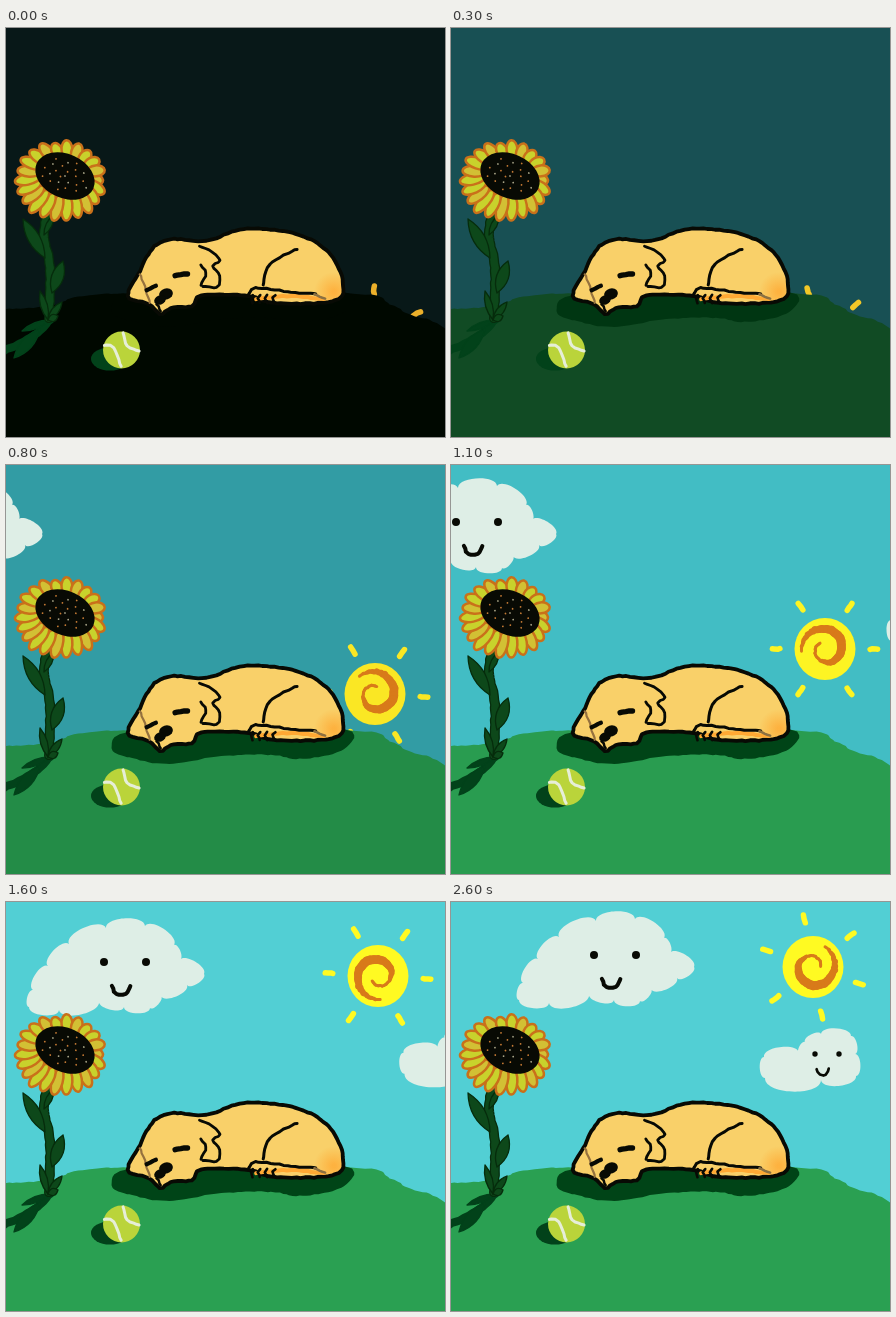
Write an HTML page with a canvas that moves like this. It is 439 px wide and 409 px high and loops after 3 s.

```html
<!DOCTYPE html>
<html lang="en">
<head>
<meta charset="utf-8">
<title>Sleeping puppy at sunrise</title>
<style>
  html, body { margin: 0; width: 100%; height: 100%; overflow: hidden; }
  canvas { display: block; }
</style>
</head>
<body>
<canvas id="stage" width="439" height="409"></canvas>
<script>
const ctx = document.getElementById('stage').getContext('2d');
const LOOP = 3000, STEP = 100, LAST = 2600, DAWN = 1400;
const INK = '#080a04', CLOUD = '#deeee6', STEM = '#0d481a', VEIN = '#062c0c';
const SHADE = '#02421a', ORANGE = '#c9701a', FUR = '#f9d069', SEAM = '#e6eed8';
const { PI, sin, cos, hypot, min, max } = Math;

// Key points as [time, x, y]
const SUN_PATH = [[300, 369, 311], [500, 366, 291], [800, 369, 229], [1100, 374, 184], [1600, 372, 74], [2300, 362, 65]];
const CLOUD_PATH = [[600, -253, 4], [1100, -138, 4], [1600, -45, 7], [1900, 0, 0]];

function along(path, time) {
  const next = path.findIndex(key => key[0] > time);
  if (next < 1) return path.at(next).slice(1);
  const [t0, x0, y0] = path[next - 1], [t1, x1, y1] = path[next];
  const k = (time - t0) / (t1 - t0);
  return [x0 + (x1 - x0) * k, y0 + (y1 - y0) * k];
}

// Ease-out between two colours; a higher power brightens sooner
function fade(from, to, powers, time) {
  const left = 1 - min(1, time / DAWN);
  return `rgb(${from.map((v, i) => Math.round(to[i] + (v - to[i]) * left ** powers[i]))})`;
}

// Fixed hand-drawn wobble in -0.5..0.5
function wobble(seed) {
  const n = sin(seed) * 43758.5;
  return n - Math.floor(n) - 0.5;
}

// Slightly uneven Catmull-Rom curve through flat x, y pairs
function trace(p, closed) {
  const n = p.length / 2;
  const index = i => closed ? (i + n) % n : max(0, min(n - 1, i));
  const spline = (i, axis, t) => {
    const [a, b, c, d] = [-1, 0, 1, 2].map(k => p[2 * index(i + k) + axis]);
    return b + t * (c - a + t * (2 * a - 5 * b + 4 * c - d + t * (3 * b - 3 * c + d - a))) / 2;
  };
  ctx.beginPath();
  for (let i = 0; i < (closed ? n : n - 1); i++) {
    const j = index(i + 1);
    const parts = Math.ceil(hypot(p[2 * j] - p[2 * i], p[2 * j + 1] - p[2 * i + 1]) / 4);
    for (let k = 0; k <= parts; k++) {
      const x = spline(i, 0, k / parts), y = spline(i, 1, k / parts);
      ctx.lineTo(x + wobble(x * 3 + y), y + wobble(x + y * 5));
    }
  }
  if (closed) ctx.closePath();
}

function fill(color) {
  ctx.fillStyle = color;
  ctx.fill();
}

function outline(color, width) {
  ctx.strokeStyle = color;
  ctx.lineWidth = width;
  ctx.stroke();
}

function blob(points, color) {
  trace(points, true);
  fill(color);
}

function line(points, color, width) {
  trace(points, false);
  outline(color, width);
}

function oval(x, y, rx, ry, color, turn = 0) {
  ctx.beginPath();
  ctx.ellipse(x, y, rx, ry, turn, 0, 2 * PI);
  fill(color);
}

function leaf(x1, y1, x2, y2, width, color = STEM, edge = VEIN) {
  const length = hypot(x2 - x1, y2 - y1);
  const nx = (y2 - y1) / length * width, ny = (x1 - x2) / length * width;
  const mx = (x1 + x2) / 2, my = (y1 + y2) / 2;
  ctx.beginPath();
  ctx.moveTo(x1, y1);
  ctx.quadraticCurveTo(mx + nx, my + ny, x2, y2);
  ctx.quadraticCurveTo(mx - nx, my - ny, x1, y1);
  fill(color);
  outline(edge, 1.3);
}

function drawSun(time) {
  const [x, y] = along(SUN_PATH, time);
  const yellow = fade([236, 176, 42], [255, 250, 34], [1.6, 1.6, 1.6], time);
  const tilt = 20 * ((min(time, 2200) - 1200) / 1000) ** 2;
  const spin = 464 - 0.18 * min(time, 2400);
  ctx.save();
  ctx.translate(x, y);
  for (let i = 0; i < 6; i++) {
    const a = (i * 60 + tilt) * PI / 180;
    line([45 * cos(a), 45 * sin(a), 53 * cos(a), 53 * sin(a)], yellow, 5.5);
  }
  oval(0, 0, 30.5, 31, yellow);
  ctx.rotate(spin * PI / 180);
  const coil = i => [(24 - i * 0.45) * cos(i * 0.2 - 1.6), (24 - i * 0.45) * sin(i * 0.2 - 1.6)];
  for (let i = 0; i < 36; i++) {
    line([...coil(i), ...coil(i + 1)], '#d87a1a', 3 + 6 * max(0, sin(i / 26 * PI)));
  }
  ctx.restore();
}

// Each edge between two points swells into a puff
function drawCloud(points, x, y) {
  ctx.save();
  ctx.translate(x, y);
  ctx.beginPath();
  ctx.moveTo(points[0], points[1]);
  for (let i = 0; i < points.length; i += 2) {
    const [x0, y0] = points.slice(i, i + 2);
    const [x1, y1] = i + 2 < points.length ? points.slice(i + 2, i + 4) : points;
    const ux = 0.3 * (y1 - y0), uy = 0.3 * (x0 - x1);
    ctx.bezierCurveTo(x0 + ux, y0 + uy, x1 + ux, y1 + uy, x1, y1);
  }
  fill(CLOUD);
}

function drawFace(x, y, gap, size, mouthY) {
  oval(x - gap, y, size, size, INK);
  oval(x + gap, y, size, size, INK);
  const w = 2.3 * size;
  line([x - w - 4, mouthY, x - 4 - w / 2, mouthY + 2 * size, x - 4 + w / 2, mouthY + 2 * size, x - 4 + w, mouthY], INK, size);
  ctx.restore();
}

function drawClouds(time) {
  drawCloud([68, 98, 72, 81, 87, 57, 108, 35, 145, 19, 184, 17, 213, 36, 219, 51, 243, 65, 226, 76, 200, 87,
    189, 99, 163, 98, 138, 92, 98, 101], ...along(CLOUD_PATH, time));
  drawFace(164, 53, 21, 4, 77);
  drawCloud([314, 176, 313, 155, 348, 151, 354, 140, 370, 132, 400, 134, 404, 152, 405, 174, 370, 178],
    (LAST - time) * 0.0845, -5 * max(0, sin((time - 1100) / 1500 * PI)));
  drawFace(376, 152, 12, 2.7, 167);
}

function drawHill(time) {
  trace([-5, 281, 45, 278, 100, 266, 340, 265, 384, 276, 402, 286, 424, 292, 445, 304], false);
  ctx.lineTo(445, 415);
  ctx.lineTo(-5, 415);
  fill(fade([0, 8, 0], [42, 160, 82], [2.2, 2.4, 2.4], time));
}

function drawStem() {
  line([44, 292, 28, 308, -4, 324], SHADE, 8);
  leaf(34, 301, 8, 330, 11, SHADE, SHADE);
  leaf(44, 292, 16, 303, 6, SHADE, SHADE);

  const spine = [41, 186, 38, 210, 44, 240, 43, 290];
  line(spine, VEIN, 10);
  line(spine, STEM, 7.5);
  leaf(17, 191, 39, 230, 12);
  leaf(57, 233, 46, 265, 12);
  leaf(48, 187, 38, 207, 6);
  for (const [x, y] of [[34, 263], [56, 274], [52, 288]]) leaf(x, y, 42, 292, 7);
}

function drawFlower() {
  oval(54, 154, 37, 33, ORANGE, 0.2);
  const petals = 22;
  for (let i = 0; i < petals; i++) {
    const a = i * 2 * PI / petals, reach = 1 + 0.1 * wobble(i * 7);
    const x1 = 58 + 25 * cos(a), y1 = 149 + 19 * sin(a);
    const x2 = 54 + 44 * reach * cos(a), y2 = 153.5 + 39 * reach * sin(a);
    oval((x1 + x2) / 2, (y1 + y2) / 2, hypot(x2 - x1, y2 - y1) / 2 + 1, 5.5,
      i % 3 ? '#c8d22c' : '#d2c034', Math.atan2(y2 - y1, x2 - x1));
    outline(ORANGE, 2.5);
  }

  ctx.save();
  ctx.translate(59, 148);
  ctx.rotate(0.42);
  oval(0, 0, 31, 22, INK);
  for (let i = 0; i < 24; i++) {
    const r = Math.sqrt(i / 24), a = i * 2.4;
    oval(26 * r * cos(a), 17 * r * sin(a), 0.9, 0.9, i % 3 ? '#c47a34' : '#a8a488');
  }
  ctx.restore();
}

function drawBall() {
  oval(104, 331, 19, 11.5, SHADE);
  oval(115.5, 322, 18.5, 18.5, '#bad43a');
  line([98, 317, 108, 320, 115, 338], SEAM, 3);
  line([117, 305, 121, 318, 133, 323], SEAM, 3);
}

function drawDog(time) {
  blob([106, 283, 122, 267, 230, 262, 338, 264, 343, 280, 322, 290, 290, 294, 265, 290, 215, 291, 160, 299, 118, 291],
    fade([0, 8, 0], [0, 68, 23], [6, 6, 6], time));

  trace([134, 243, 146, 221, 165, 211, 200, 213, 238, 201, 290, 206, 322, 224, 337, 254, 328, 273, 268, 275,
    242, 268, 196, 267, 186, 278, 165, 280, 154, 286, 143, 276, 122, 268], true);
  fill(FUR);
  const warm = ctx.createRadialGradient(328, 264, 2, 328, 264, 20);
  warm.addColorStop(0, '#ffa52eb0');
  warm.addColorStop(1, '#ffa52e00');
  fill(warm);
  outline(INK, 3.8);

  // haunch and paw
  line([250, 271, 285, 268, 318, 271], '#ffa934', 4);
  line([291, 221, 264, 236, 257, 257], INK, 3);
  line([242, 267, 250, 260, 285, 264, 310, 266], INK, 3);
  line([308, 266, 319, 271], '#8b7042', 2.5);
  for (const x of [245, 252, 259, 267]) line([x + 2, 267, x, 270, x + 2, 275], INK, 2.6);

  // ears
  line([193, 218, 203, 222, 214, 232, 207, 238, 214, 248, 211, 259, 197, 258], INK, 2.8);
  line([195, 237, 200, 245, 195, 257], INK, 2.8);
  line([134, 246, 140, 262, 144, 275], '#95713e', 2.2);

  // face
  line([141, 262, 150, 258], INK, 4.2);
  line([169, 248, 181, 246], INK, 5.5);
  oval(160, 266, 7, 5.5, INK, -0.3);
  oval(154, 272, 6, 4.5, INK, -0.4);
  line([151, 276, 155, 283], INK, 2.5);
}

function draw(time) {
  ctx.lineCap = ctx.lineJoin = 'round';
  ctx.fillStyle = fade([8, 24, 24], [82, 207, 212], [1, 1.5, 1.6], time);
  ctx.fillRect(0, 0, 439, 409);
  drawSun(time);
  drawClouds(time);
  drawHill(time);
  drawStem();
  drawFlower();
  drawBall();
  drawDog(time);
}

function tick() {
  const time = performance.now() % LOOP;
  draw(min(LAST, Math.floor(time / STEP) * STEP));
  requestAnimationFrame(tick);
}
tick();
</script>
</body>
</html>
```
